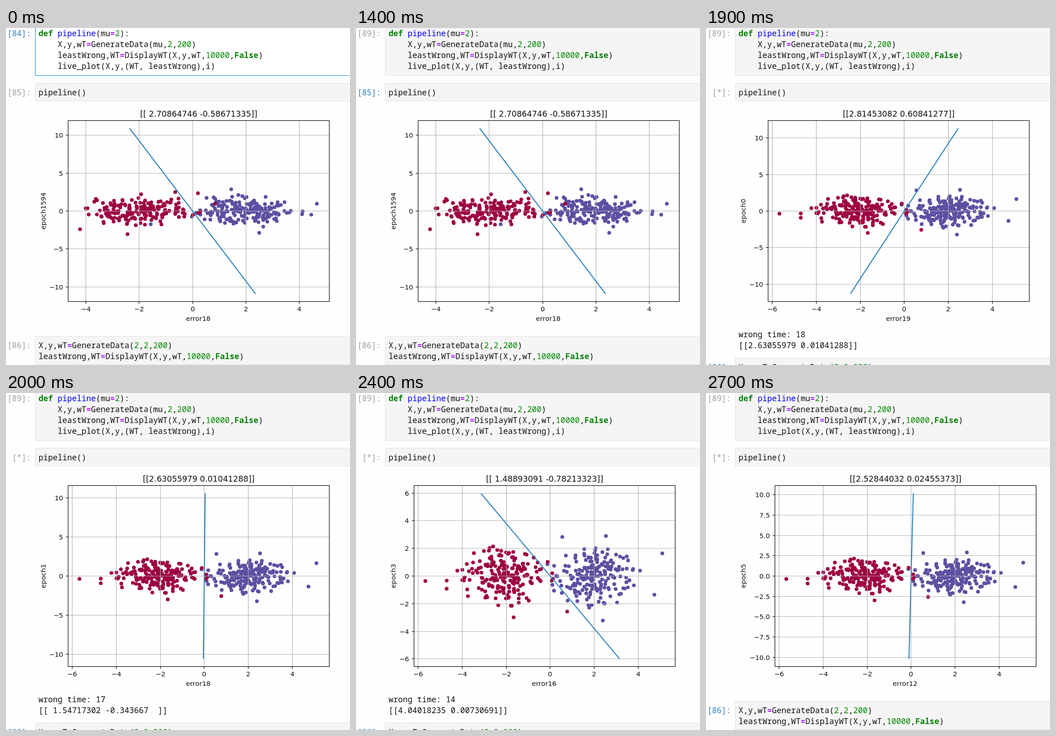
These frames come from a looping animation (756 px wide and 741 px high, 7000 ms). An HTML page with a canvas:

```html
<!DOCTYPE html>
<html lang="en">
<head>
<meta charset="utf-8">
<title>Perceptron notebook</title>
<style>
html, body { margin: 0; width: 100%; height: 100%; overflow: hidden; background: #fefefe; }
canvas { display: block; }
</style>
</head>
<body>
<canvas id="stage" width="756" height="741"></canvas>
<script>
const ctx = document.getElementById('stage').getContext('2d');
const LOOP = 7000;
const MONO = '17.5px "Noto Sans Mono", "DejaVu Sans Mono", monospace';
const SANS = 'px "DejaVu Sans", sans-serif';
const SMALL = 14.6 + SANS;
const RED = '#9e0142', BLUE = '#5e4fa2', GRID = '#b0b0b0', INK = '#111';
const TEXT_X = 71.5, LINE = 24.3, AXES_W = 574, AXES_H = 398;

const PIPELINE = [
  'def pipeline(mu=2):',
  '    X,y,wT=GenerateData(mu,2,200)',
  '    leastWrong,WT=DisplayWT(X,y,wT,10000,False)',
  '    live_plot(X,y,(WT, leastWrong),i)'
];
const SETUP = ['X,y,wT=GenerateData(2,2,200)', 'leastWrong,WT=DisplayWT(X,y,wT,10000,False)'];

// Each epoch shows its own weights and prints the next epoch's.
const EPOCHS = [
  { weights: '[[2.81453082 0.60841277]]', errors: 19 },
  { weights: '[[2.63055979 0.01041288]]', errors: 18 },
  { weights: '[[ 1.54717302 -0.343667  ]]', errors: 17 },
  { weights: '[[ 1.48893091 -0.78213323]]', errors: 16 },
  { weights: '[[4.04018235 0.00730691]]', errors: 14 },
  { weights: '[[2.52844032 0.02455373]]', errors: 12 }
];

function random(seed) {
  return () => {
    seed = (seed + 0x6D2B79F5) | 0;
    let r = Math.imul(seed ^ (seed >>> 15), 1 | seed);
    r = (r + Math.imul(r ^ (r >>> 7), 61 | r)) ^ r;
    return ((r ^ (r >>> 14)) >>> 0) / 4294967296;
  };
}

// 200 normal points around (mu, 0); the widest ones are given.
function cluster(mu, seed, extremes) {
  const rnd = random(seed), pts = [...extremes];
  while (pts.length < 200) {
    const r = Math.sqrt(-2 * Math.log(1 - rnd())), a = 2 * Math.PI * rnd();
    if (r < 2.3) pts.push([mu + r * Math.cos(a), r * Math.sin(a)]);
  }
  return pts;
}

const first = {
  zero: 273.5, scale: 58.6,
  red: cluster(-2, 11, [[-4.22, -2.4], [-2.44, -3.05], [-.65, 2.5], [.2, 2.34], [.84, .96]]),
  blue: cluster(2, 12, [[4.66, .96], [4.45, -.48], [2.5, -2.87], [1.45, 2.87], [-1.57, -1.74]])
};
const second = {
  zero: 319, scale: 52.5,
  red: cluster(-2, 21, [[-5.57, 1.31], [-5, .53], [-4.54, 1.7], [-1.82, 2.56], [.33, -1.1]]),
  blue: cluster(2, 22, [[4.14, 2.23], [4.33, -.07], [2.79, -2.82], [.2, -2.8], [-.3, 1.7]])
};
const third = {
  zero: 299.3, scale: 48.4,
  red: cluster(-2, 31, [[-5.67, -.36], [-4.7, -.33], [-4.7, -.92], [-1.66, -2.99], [.77, -2.57]]),
  blue: cluster(2, 32, [[5.09, 1.64], [4.73, -1.35], [2.39, -3.22], [.55, 2.83], [2.53, 2.9]])
};

function text(str, x, y, font, color = INK, align = 'left') {
  ctx.font = font;
  ctx.fillStyle = color;
  ctx.textAlign = align;
  ctx.fillText(str, x, y);
}

function stroke(x1, y1, x2, y2, color, width) {
  ctx.strokeStyle = color;
  ctx.lineWidth = width;
  ctx.beginPath();
  ctx.moveTo(x1, y1);
  ctx.lineTo(x2, y2);
  ctx.stroke();
}

function code(line, x, y, matched) {
  const tokens = line.match(/\d+|[A-Za-z_]+|[^]/g);
  const open = tokens.indexOf('('), close = tokens.lastIndexOf(')');
  tokens.forEach((tok, i) => {
    let color = INK, weight = '';
    if (tok === 'def' || tok === 'False') { color = '#008000'; weight = 'bold '; }
    else if (/\d/.test(tok)) color = '#008800';
    else if (tok === '=') { color = '#aa22ff'; weight = 'bold '; }
    else if (tokens[i - 2] === 'def') color = '#0000ff';
    else if (matched && (i === open || i === close)) color = '#00bb00';
    text(tok, x, y, weight + MONO, color);
    x += ctx.measureText(tok).width;
  });
  return x;
}

function cell(label, lines, top, height, { active, editing, matched, cursor } = {}) {
  ctx.fillStyle = editing ? '#ffffff' : '#f5f5f5';
  ctx.fillRect(64, top, 720, height);
  ctx.strokeStyle = editing ? '#42a0ee' : '#e0e0e0';
  ctx.lineWidth = editing ? 1.4 : 1;
  ctx.strokeRect(64.5, top + .5, 720, height - 1);
  const base = top + 26.5;
  text(label, 55.3, base, MONO, active ? '#307fc1' : '#9e9e9e', 'right');
  lines.forEach((line, i) => {
    const end = code(line, TEXT_X, base + i * LINE, matched && i === 2);
    if (cursor && i === 2) stroke(end + .5, 48, end + .5, 72, INK, 1.3);
  });
}

const crisp = v => Math.floor(v) + .5;
const tickLabel = (v, step) => (step % 1 ? v.toFixed(1) : String(v)).replace('-', '\u2212');

function plot(data, title, xLabel, yLabel, top = 203.5) {
  const [w0, w1] = title.match(/-?[\d.]+/g).map(Number);
  const limit = 4.4 * w0;
  const step = limit < 8 ? 2 : limit < 11.25 ? 2.5 : 5;
  const left = step === 2 ? 127.5 : step === 5 ? 136.5 : 151.5;
  const right = left + AXES_W, bottom = top + AXES_H, mid = left + AXES_W / 2;
  const X = v => left + data.zero + v * data.scale;
  const Y = v => top + AXES_H / 2 * (1 - v / limit);

  for (const [pts, color] of [[data.blue, BLUE], [data.red, RED]]) {
    ctx.fillStyle = color;
    for (const [x, y] of pts) {
      ctx.beginPath();
      ctx.arc(X(x), Y(y), 4.1, 0, 2 * Math.PI);
      ctx.fill();
    }
  }

  for (let v = -6; v <= 4; v += 2) {
    const x = crisp(X(v));
    if (x < left) continue;
    stroke(x, top, x, bottom, GRID, 1.2);
    stroke(x, bottom, x, bottom + 5, '#000', 1.2);
    text(tickLabel(v, 2), x, bottom + 21, SMALL, INK, 'center');
  }
  const n = Math.floor(limit / step);
  for (let k = -n; k <= n; k++) {
    const y = crisp(Y(k * step));
    stroke(left, y, right, y, GRID, 1.2);
    stroke(left - 5, y, left, y, '#000', 1.2);
    text(tickLabel(k * step, step), left - 11, y + 5, SMALL, INK, 'right');
  }

  ctx.lineCap = 'square';
  stroke(X(-4 * w1), Y(-4 * w0), X(4 * w1), Y(4 * w0), '#2f83bf', 2.2);
  ctx.lineCap = 'butt';
  ctx.strokeStyle = '#000';
  ctx.lineWidth = 1.2;
  ctx.strokeRect(left, top, AXES_W, AXES_H);

  text(title, mid, top - 9, 17.6 + SANS, INK, 'center');
  text(xLabel, mid - 1, bottom + 42, SMALL, INK, 'center');
  ctx.save();
  ctx.translate(86.5, top + AXES_H / 2);
  ctx.rotate(-Math.PI / 2);
  text(yLabel, 0, 0, SMALL, INK, 'center');
  ctx.restore();
}

function epochAt(t) {
  if (t < 2000) return 0;
  if (t < 2600) return 1 + Math.floor((t - 2000) / 200);
  return t < 2700 ? 4 : 5;
}

function draw(t) {
  ctx.fillStyle = '#fefefe';
  ctx.fillRect(0, 0, 756, 741);

  const editing = t < 1400, running = t >= 1800;
  cell(editing ? '[84]:' : '[89]:', PIPELINE, -9, 114, {
    editing, active: editing,
    matched: editing && t >= 500,
    cursor: t >= 500 && t < 1000
  });
  cell(running ? '[*]:' : '[85]:', ['pipeline()'], 121, 40, { active: !editing && !running });

  let setupTop = 677;
  if (!running) {
    plot(first, '[[ 2.70864746 -0.58671335]]', 'error18', 'epoch1594');
  } else if (t < 1900) {
    setupTop = 206;
    plot(second, '[[2.97018664 1.09121973]]', 'error9', 'epoch2', 313.5);
  } else {
    const e = epochAt(t), next = EPOCHS[e + 1];
    plot(third, EPOCHS[e].weights, 'error' + EPOCHS[e].errors, 'epoch' + e);
    if (next) {
      setupTop = 725;
      text('wrong time: ' + next.errors, TEXT_X, 680, MONO);
      text(next.weights, TEXT_X, 704, MONO);
    }
  }
  cell('[86]:', SETUP, setupTop, 64, { active: running });
}

function tick() {
  draw(performance.now() % LOOP);
  requestAnimationFrame(tick);
}
tick();
</script>
</body>
</html>
```
